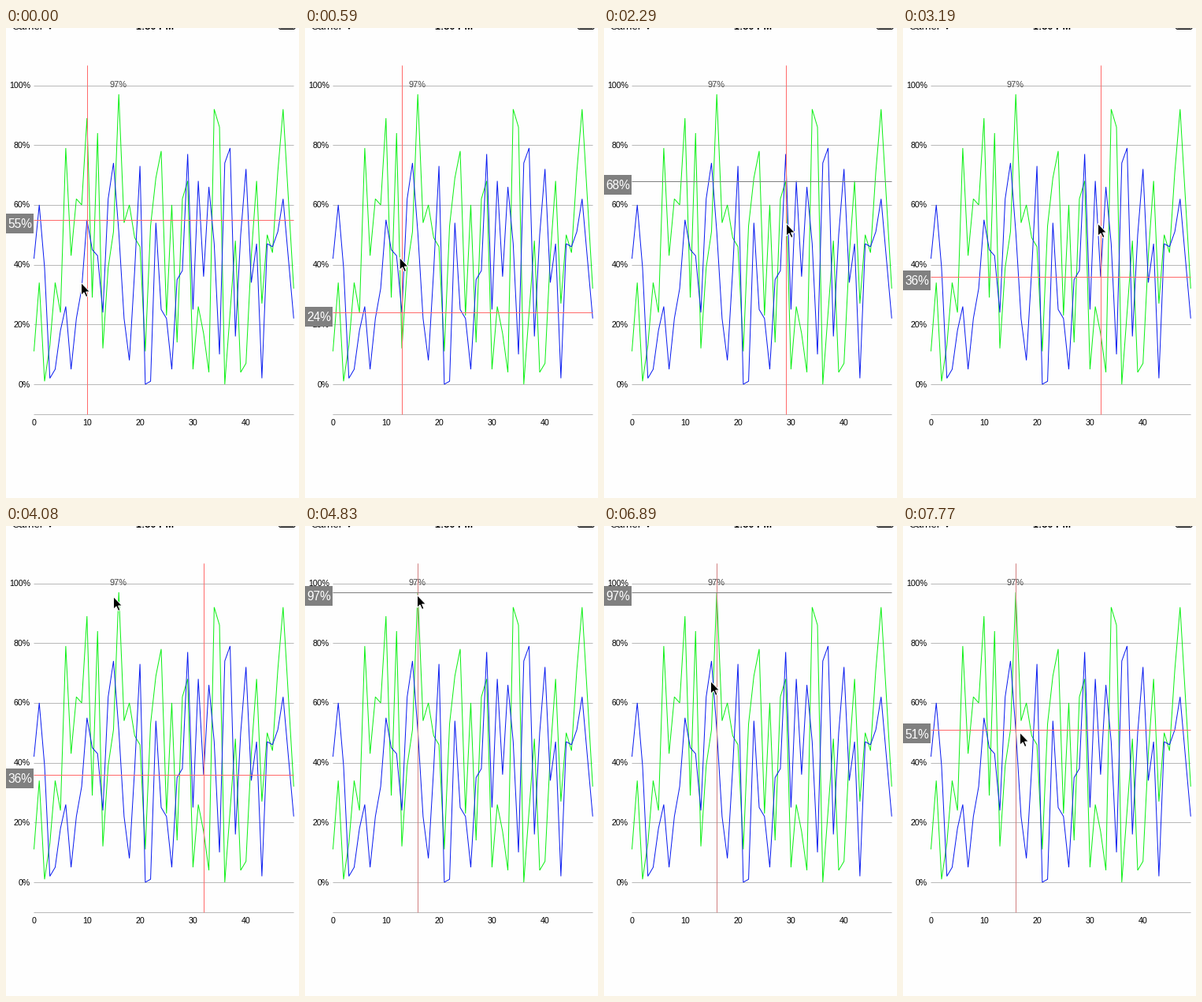
Animation of 372 by 595 pixels, one loop 8000 ms. Source, as a matplotlib script:

```python
import numpy as np
import matplotlib.pyplot as plt
from matplotlib.animation import FuncAnimation
from matplotlib.patches import FancyBboxPatch, Polygon, Rectangle

W, H, DPI = 372, 595, 100
LOOP, STEP = 8000, 40
PX = 72 / DPI
LEFT, RIGHT, TOP, BOTTOM = 35.5, 365, 47, 488.5
DX = 6.73
RED, GREY, PINK = (1, 0.42, 0.42), (0.5, 0.5, 0.5), (0.82, 0.5, 0.5)

GREEN_DATA = [11, 34, 1, 13, 34, 24, 79, 43, 62, 60, 89, 29, 84, 12, 39, 51, 97,
              54, 60, 49, 46, 11, 53, 69, 78, 23, 60, 14, 62, 68, 5, 26, 17, 4,
              92, 86, 0, 24, 48, 4, 7, 43, 68, 27, 50, 44, 71, 92, 62, 32]
BLUE_DATA = [42, 60, 39, 2, 5, 18, 26, 5, 22, 32, 55, 45, 43, 24, 62, 74, 51,
             22, 8, 38, 73, 0, 1, 54, 25, 22, 5, 35, 38, 77, 25, 68, 36, 66,
             47, 10, 74, 79, 16, 50, 72, 34, 47, 2, 47, 46, 51, 62, 42, 22]

# start ms, end ms, steps, pressed steps, vertical colour, pointer path
MOVES = [
    (150, 1100, 7, range(7), RED, [(104, 308), (151, 254)]),
    (1250, 1840, 5, range(5), GREY,
     [(157, 252), (163, 250), (180, 249), (203, 248), (225, 247)]),
    (2290, 2740, 4, range(4), RED, [(231, 247), (238, 247), (245, 247), (250, 247)]),
    (3190, 4230, 8, (), RED,
     [(247, 247), (225, 225), (195, 185), (165, 140),
      (142, 108), (133, 94), (136, 89), (141, 87)]),
    (4530, 4530, 1, (0,), PINK, [(142, 87)]),
    (4830, 5860, 8, (), PINK,
     [(142, 87), (140, 98), (136, 130), (131, 175),
      (126, 222), (125, 250), (128, 253), (133, 238)]),
    (6010, 6590, 5, (), PINK,
     [(134, 230), (136, 220), (138, 203), (136, 190), (134, 188)]),
    (6890, 7770, 7, (3,), PINK,
     [(135, 196), (138, 215), (141, 240), (143, 256),
      (145, 260), (147, 262), (148, 261)]),
]


def px_x(i):
    return LEFT + DX * i


def px_y(v):
    return 451 - 3.785 * np.asarray(v)


def pick(x, y):
    """Index, value and line colour of the data point nearest the pointer."""
    i = int(round((x - LEFT) / DX))
    g, b = GREEN_DATA[i], BLUE_DATA[i]
    if abs(px_y(g) - y) < abs(px_y(b) - y):
        return i, g, GREY
    return i, b, RED


def build_states():
    mark = (10, 55, RED, RED)
    states = [(0, (95, 322), mark)]
    for start, end, n, pressed, tone, path in MOVES:
        u = np.linspace(0, len(path) - 1, n)
        xs, ys = (np.interp(u, range(len(path)), c) for c in zip(*path))
        times = np.linspace(start, end, n) // 10 * 10
        for k, (t, x, y) in enumerate(zip(times, xs, ys)):
            if k in pressed:
                mark = (*pick(x, y), tone)
            states.append((t, (x, y), mark))
    return states


STATES = build_states()
TIMES = [s[0] for s in STATES]

fig = plt.figure(figsize=(W / DPI, H / DPI), dpi=DPI, facecolor="#fefefe")
ax = fig.add_axes([0, 0, 1, 1])
ax.set_xlim(0, W)
ax.set_ylim(H, 0)
ax.axis("off")


def label(x, y, s, size, ha="center", color="black", **kw):
    return ax.text(x, y + 0.36 * size, s, fontsize=size * PX, ha=ha, va="baseline",
                   color=color, family="Liberation Sans", **kw)


def line(xs, ys, color, z, width=1):
    return ax.plot(xs, ys, color=color, lw=width * PX, zorder=z,
                   solid_capstyle="butt", solid_joinstyle="miter")[0]


# status bar, cut by the top edge
label(7, -2.3, "Carrier", 13.3, ha="left")
label(189, -2.2, "1:30 PM", 12.7, weight="bold")
ax.add_patch(Polygon([(50, -6), (62, -6), (56, 2)], fc="black", lw=0))
ax.add_patch(FancyBboxPatch((347.5, -6), 18.5, 6.5, fc="black", lw=0,
                            boxstyle="round,pad=0,rounding_size=1.5",
                            mutation_aspect=1))
ax.add_patch(FancyBboxPatch((346.5, -7), 20.5, 8.5, fc="none", ec="black", lw=PX,
                            boxstyle="round,pad=0,rounding_size=2"))

# grid and axis labels
for v in range(0, 101, 20):
    line([35, RIGHT], [px_y(v)] * 2, "#b9b9b9", 1)
    label(31, px_y(v) - 0.3, f"{v}%", 10.6, ha="right")
line([35, RIGHT], [BOTTOM] * 2, "#b9b9b9", 1)
for i in range(0, 41, 10):
    label(px_x(i), 498.7, str(i), 10.6)

# series
xs = px_x(np.arange(50))
line(xs, px_y(GREEN_DATA), "#0df015", 2)
line(xs, px_y(BLUE_DATA), "#0a1cf0", 3)
label(143, 71, "97%", 11, color="#444444", zorder=4)

# crosshair, value tag and pointer
v_line = line([0, 0], [TOP, BOTTOM], RED, 5)
h_line = line([35, RIGHT], [0, 0], RED, 5)
tag = ax.add_patch(Rectangle((0, 0), 35, 25, fc="#808080", lw=0, zorder=6))
tag_text = label(17.5, 0, "", 15.5, color="white", zorder=7)
ARROW = np.array([(0, 0), (0, 15.8), (3.6, 12.4), (6.1, 18), (8.5, 17),
                  (6.1, 11.5), (11, 11.5)])
pointer = ax.add_patch(Polygon(ARROW, fc="black", ec="white", lw=PX, zorder=8))


def update(n):
    t = n * STEP + 30
    _, tip, (i, value, h_tone, v_tone) = STATES[np.searchsorted(TIMES, t, "right") - 1]
    y = float(px_y(value))
    v_line.set_xdata([px_x(i)] * 2)
    v_line.set_color(v_tone)
    h_line.set_ydata([y] * 2)
    h_line.set_color(h_tone)
    tag.set_y(round(y - 7.6))
    tag_text.set_y(y + 5 + 0.36 * 15.5)
    tag_text.set_text(f"{value}%")
    pointer.set_xy(ARROW + tip + np.array([0.5, 0.5]))
    return v_line, h_line, tag, tag_text, pointer


anim = FuncAnimation(fig, update, frames=LOOP // STEP, interval=STEP,
                     repeat=True, repeat_delay=0, blit=False)
plt.show()
```
